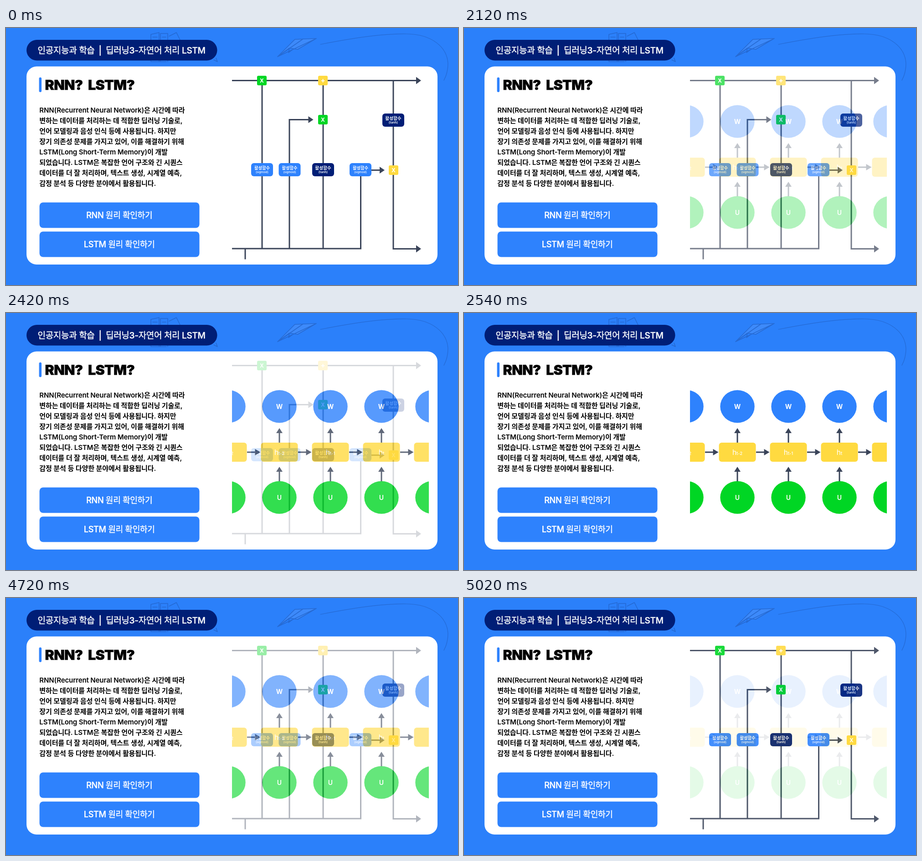
An HTML page for the animation above (5080 ms loop, 992 by 565 pixels).

```html
<!DOCTYPE html>
<html lang="ko">
<head>
<meta charset="utf-8">
<title>RNN? LSTM?</title>
<style>
html, body { margin: 0; width: 100%; height: 100%; overflow: hidden; background: #2b80fa; }
svg { display: block; width: 992px; height: 565px; }
text { font-family: Inter, 'Noto Sans CJK KR', 'Noto Sans CJK', sans-serif; white-space: pre; }
.mid { text-anchor: middle; fill: #fff; }
.medium { font-weight: 500; fill: #fff; stroke: #fff; stroke-width: .4; }
.line { fill: none; stroke: #3a4459; stroke-width: 3; }
.head { fill: #3a4459; }
.sketch { fill: none; stroke: #2466cd; stroke-width: 1.6; stroke-linejoin: round; stroke-linecap: round; opacity: .85; }
</style>
</head>
<body>
<svg viewBox="0 0 992 565">
  <clipPath id="panel"><rect x="496" y="100" width="432" height="412"/></clipPath>
  <rect width="992" height="565" fill="#2b80fa"/>
  <path d="M596 63L634 25L681 23L640 47L622 44Z" fill="#4a92fb" opacity=".6"/>
  <g class="sketch">
    <path d="M596 63L634 25L681 23L640 47L622 44Z M596 63L681 23 M596 63L652 24 M622 44L620 54L631 46"/>
    <path d="M690 36C760 22 830 12 880 13C935 14 968 42 970 78C970 94 966 106 961 115" stroke-width="1.2"/>
    <path d="M318 74V14L336 10V74 M339 74V12H355V74 M358 18L374 10L384 30 M322 20H332 M343 20H351 M318 74H352 M456 70L464 74L461 66"/>
  </g>

  <rect x="45" y="26" width="418.5" height="45.5" rx="22.75" fill="#001e76"/>
  <text class="medium" y="55.8" font-size="19" letter-spacing="-.3"><tspan x="69.5">인공지능과 학습</tspan><tspan x="203.5">|</tspan><tspan x="219">딥러닝3-자연어 처리 LSTM</tspan></text>

  <rect x="45" y="84.5" width="902" height="435.5" rx="22" fill="#fff"/>
  <rect x="72.5" y="108.5" width="5.5" height="32.5" rx="2.75" fill="#2e82fd"/>
  <text y="136" font-size="30.5" font-weight="900" letter-spacing="-.7" stroke="#000" stroke-width=".5"><tspan x="85.5">RNN?</tspan><tspan x="180">LSTM?</tspan></text>
  <g id="body" font-size="15" font-weight="600" letter-spacing="-.11"></g>
  <g id="buttons" font-size="18" letter-spacing="-.25"></g>

  <g clip-path="url(#panel)">
    <g id="lstm"></g>
    <g id="rnn" opacity="0"></g>
  </g>
</svg>
<script>
const BLUE = '#2e82fd', NAVY = '#001e76', GREEN = '#00d624', YELLOW = '#ffda40';
const $ = id => document.getElementById(id);

const rect = (x, y, w, h, r, fill) =>
  `<rect x="${x}" y="${y}" width="${w}" height="${h}" rx="${r}" fill="${fill}"/>`;
const label = (x, y, size, weight, text) =>
  `<text class="mid" x="${x}" y="${y}" font-size="${size}" font-weight="${weight}">${text}</text>`;
const line = d => `<path class="line" d="${d}"/>`;
const right = (x, y, len = 11, half = 8) =>
  `<path class="head" d="M${x} ${y}l${-len} ${-half}v${2 * half}z"/>`;
const up = (x, y) => `<path class="head" d="M${x} ${y}l-7 11h14z"/>`;
const op = (x, y, fill, sign) =>
  rect(x - 10.5, y - 10.5, 21, 21, 3, fill) + label(x, y + 4.5, sign === '+' ? 15 : 12, 700, sign);
const gate = (x, y, fn) => {
  const tanh = fn === 'tanh';
  return rect(x - 24, y - 14.5, 48, 29, 6, tanh ? NAVY : BLUE) +
    label(x, y - 1, tanh ? 9.6 : 9.3, 600, '활성함수') +
    label(x, y + 7.5, tanh ? 7 : 6.2, tanh ? 600 : 500, `(${fn})`);
};

$('body').innerHTML = [
  'RNN(Recurrent Neural Network)은 시간에 따라',
  '변하는 데이터를 처리하는 데 적합한 딥러닝 기술로,',
  '언어 모델링과 음성 인식 등에 사용됩니다. 하지만',
  '장기 의존성 문제를 가지고 있어, 이를 해결하기 위해',
  'LSTM(Long Short-Term Memory)이 개발',
  '되었습니다. LSTM은 복잡한 언어 구조와 긴 시퀀스',
  '데이터를 더 잘 처리하며, 텍스트 생성, 시계열 예측,',
  '감정 분석 등 다양한 분야에서 활용됩니다.'
].map((s, i) => `<text x="73.3" y="${186.4 + 23 * i}">${s}</text>`).join('');

$('buttons').innerHTML = ['RNN', 'LSTM'].map((name, i) => {
  const y = 383.5 + 64 * i;
  return rect(73.5, y, 351, 56, 8, BLUE) +
    `<text class="mid medium" x="248.7" y="${y + 34.5}">${name} 원리 확인하기</text>`;
}).join('');

$('lstm').innerHTML =
  line('M495 115.5H902 M562 115V485 M665 201.5H622V485 M696 115V485 M850 115V485.5H902') +
  line('M495 485H778.5V312 M525 485V508.5 M800 312.5H822') +
  right(911, 115.5) + right(911, 485.5) + right(674.5, 201.5, 11, 7.5) + right(831, 312.5, 11, 7.5) +
  op(561.5, 115.5, GREEN, 'X') + op(695.5, 115.5, YELLOW, '+') +
  op(695.5, 201.5, GREEN, 'X') + op(850.5, 312.5, YELLOW, 'X') +
  gate(562, 311.5, 'sigmoid') + gate(622.5, 311.5, 'sigmoid') + gate(696, 311.5, 'tanh') +
  gate(778, 311.5, 'sigmoid') + gate(850, 202.5, 'tanh');

const cell = (sub, i) => {
  const x = 488 + 112 * i;
  const disc = (y, fill, text, weight) =>
    `<ellipse cx="${x}" cy="${y}" rx="37.7" ry="36" fill="${fill}"/>` + label(x, y + 5.2, 14, weight, text);
  return disc(205.5, BLUE, 'W', 700) + disc(405.5, GREEN, 'U', 600) +
    line(`M${x} 285V262 M${x} 370V347 M${x + 41} 306H${x + 60}`) +
    up(x, 253) + up(x, 338) + right(x + 70.5, 306, 12, 7) +
    rect(x - 40.5, 285, 81, 42, 6, YELLOW) +
    (sub && label(x, 311.5, 15.5, 400, `h<tspan font-size="9.5" font-weight="500">${sub}</tspan>`));
};
$('rnn').innerHTML = rect(490, 90, 444, 430, 0, '#fff') +
  ['t-2', 't-2', 't-1', 't', ''].map(cell).join('');

// Each cross-fade advances in tenths, one every 60 ms.
const fade = (t, start) => Math.min(10, Math.max(0, Math.floor((t - start) / 60) + 1)) / 10;

function draw() {
  const t = performance.now() % 5080;
  $('rnn').setAttribute('opacity', fade(t, 2000) - fade(t, 4540));
  requestAnimationFrame(draw);
}
draw();
</script>
</body>
</html>
```
